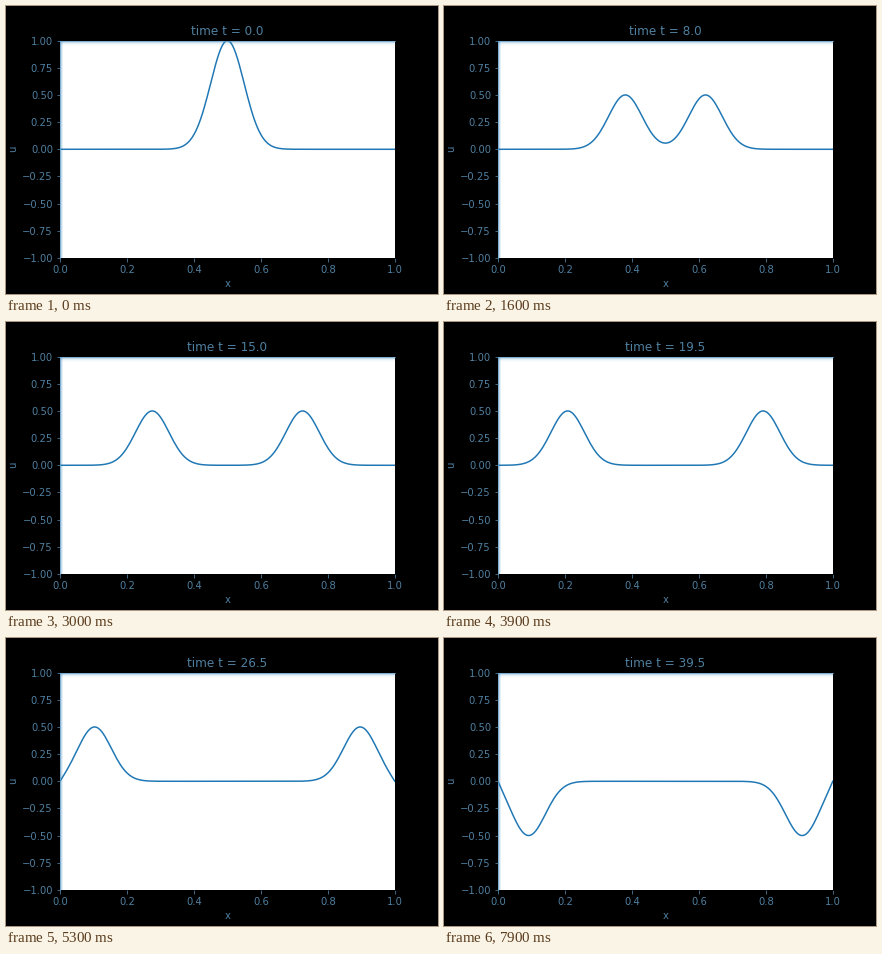
These frames come from a looping animation (432 px wide and 288 px high, 8 s). A matplotlib script:

```python
import matplotlib.pyplot as plt
import numpy as np
from matplotlib.animation import FuncAnimation

FRAMES, INTERVAL = 80, 100
DT = 0.5          # model time per step
SPEED = 0.01497   # wave speed
SIGMA = 0.05      # width of the initial pulse
INK = "#4f7f9f"
BLUE = "#1f77b4"

plt.rcParams.update({
    "font.family": "DejaVu Sans",
    "font.size": 10,
    "figure.subplot.bottom": 0.125,
    "text.color": INK,
    "axes.titlecolor": INK,
    "axes.labelcolor": INK,
    "xtick.color": INK,
    "ytick.color": INK,
})


def pulse(x):
    return np.exp(-x**2 / (2 * SIGMA**2))


def wave(x, t):
    """d'Alembert solution with fixed ends, using odd mirror images."""
    u = np.zeros_like(x)
    for shift in (-SPEED * t, SPEED * t):
        for centre, sign in ((0.5, 1), (-0.5, -1), (1.5, -1)):
            u += 0.5 * sign * pulse(x - centre - shift)
    return u


def soft_edges(ax, depth=4):
    """Fade a pale blue into the white along the top and left edges."""
    box = ax.get_window_extent()
    dx, dy = 1 / box.width, 2 / box.height
    for k in range(1, depth + 1):
        style = dict(color=BLUE, lw=0, alpha=0.26 * 0.45 ** (k - 1), zorder=1)
        ax.axhspan(1 - (k + 1) * dy, 1 - k * dy, **style)
        if k < depth - 1:
            ax.axvspan(k * dx, (k + 1) * dx, **style)


fig, ax = plt.subplots(figsize=(6, 4), dpi=72, facecolor="black")
ax.set(xlim=(0, 1), ylim=(-1, 1), xlabel="x", ylabel="u")
ax.set_xticks(np.linspace(0, 1, 6))
ax.set_yticks(np.linspace(-1, 1, 9))
ax.spines["bottom"].set_visible(False)
ax.spines["right"].set_color("black")
ax.spines[["left", "top"]].set_color("#5f9cc6")
soft_edges(ax)

title = ax.set_title("time t = 0.0")
x = np.linspace(0, 1, 201)
line, = ax.plot(x, wave(x, 0), color=BLUE, lw=1.5)


def update(i):
    t = i * DT
    line.set_ydata(wave(x, t))
    title.set_text(f"time t = {t:.1f}")
    return line, title


anim = FuncAnimation(fig, update, frames=FRAMES, interval=INTERVAL,
                     repeat=True, repeat_delay=0)
plt.show()
```
